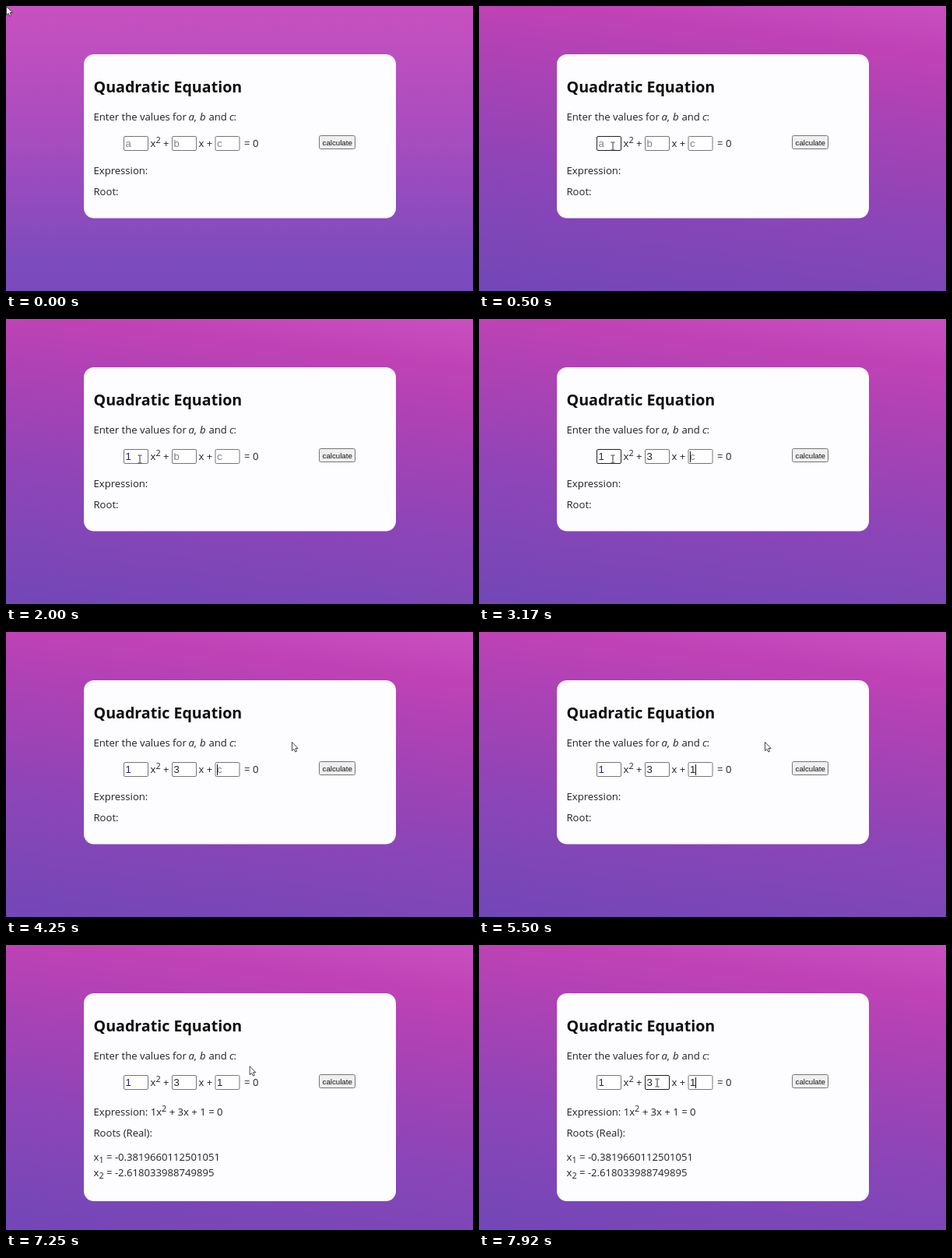
An HTML page for the animation above (8000 ms loop, 600 by 366 pixels).

```html
<!DOCTYPE html>
<html lang="en">
<head>
<meta charset="utf-8">
<title>Quadratic Equation</title>
<style>
html, body { margin: 0; width: 100%; height: 100%; overflow: hidden; }
body { background: linear-gradient(7deg, #7247b8, #8b45b7 35%, #a942b5 65%, #bf42b5 85%, #c950c1); }
#dawn { position: absolute; inset: 0; background: linear-gradient(#c950c0, #a44cbe 50%, #7c4bbe 90%, #7a4bbe); }
svg { position: absolute; left: 0; top: 0; font: 13.1px "Open Sans", sans-serif; fill: #212121; }
text { white-space: pre; }
h1 { display: none; }
.title { font-size: 19.65px; font-weight: 700; fill: #0c0c0c; }
.small { font-size: 10.9px; }
.it { font-style: italic; }
.field rect { fill: #fff; stroke: #767676; }
.field.hover rect { stroke: #222; }
.field text { font-family: "Liberation Sans", Arial, sans-serif; fill: #808080; }
.field.filled text { fill: #222; }
#a.filled text { fill: #1a1a8c; }
#menu { font-size: 7.8px; fill: #555; }
</style>
</head>
<body>
<div id="dawn"></div>
<svg width="600" height="366" viewBox="0 0 600 366">
  <rect id="card" x="100" y="62" width="401" height="210.5" rx="13" fill="#fdfcfe"/>
  <text class="title" x="112.5" y="111">Quadratic Equation</text>
  <text y="147"><tspan x="112.5">Enter the values for</tspan><tspan class="it" x="234.5">a</tspan><tspan x="241.5">,</tspan><tspan class="it" x="249">b</tspan><tspan x="260.5">and</tspan><tspan class="it" x="287">c</tspan><tspan x="292.5">:</tspan></text>
  <text y="181"><tspan x="185.5">x</tspan><tspan class="small" x="192.5" y="176">2</tspan><tspan x="202" y="181">+</tspan><tspan x="247.5">x +</tspan><tspan x="306">= 0</tspan></text>
  <g id="fields"></g>
  <rect x="402.5" y="166.5" width="46" height="17" rx="2" fill="#efefef" stroke="#767676"/>
  <text x="425.7" y="178.7" text-anchor="middle" style="font:9.7px 'Liberation Sans',Arial,sans-serif" fill="#111">calculate</text>
  <g id="empty">
    <text x="112.5" y="216">Expression:</text>
    <text x="112.5" y="243">Root:</text>
  </g>
  <g id="result">
    <text x="112.5" y="219">Expression: 1x<tspan class="small" dy="-5">2</tspan><tspan dy="5"> + 3x + 1 = 0</tspan></text>
    <text x="112.5" y="246">Roots (Real):</text>
    <text x="112.5" y="277">x<tspan class="small" dy="3">1</tspan><tspan dy="-3"> = -0.3819660112501051</tspan></text>
    <text x="112.5" y="297">x<tspan class="small" dy="3">2</tspan><tspan dy="-3"> = -2.618033988749895</tspan></text>
  </g>
  <g id="menu"><rect x="153.5" y="190.5" width="97" height="140.5" rx="2" fill="#fff" stroke="#ddd"/></g>
  <path id="caret" d="M.5 170v14" stroke="#111"/>
  <path id="arrow" d="M.5 .5V11.5L3 9.3L4.8 13L6.6 12.2L4.9 8.5H8.2Z" fill="#fff" stroke="#333" stroke-width=".9"/>
  <path id="beam" d="M-2.5 -5H-.7L0 -4.4L.7 -5H2.5M0 -4.4V4.4M-2.5 5H-.7L0 4.4L.7 5H2.5" fill="none" stroke="#333"/>
</svg>
<script>
const $ = id => document.getElementById(id);
const show = (id, on) => $(id).style.display = on ? '' : 'none';
const place = (id, x, y) => $(id).setAttribute('transform', `translate(${x} ${y})`);

const FPS = 12, LOOP = 8000;
// typed: frame at which the value replaces the placeholder
const fields = [
  { id: 'a', x: 151, value: '1', typed: 18 },
  { id: 'b', x: 213, value: '3', typed: 33 },
  { id: 'c', x: 268.5, value: '1', typed: 53 }
];
$('fields').innerHTML = fields.map(f =>
  `<g class="field" id="${f.id}"><rect x="${f.x + .5}" y="167.5" width="31" height="18" rx="1.5"/><text x="${f.x + 2.6}" y="181"></text></g>`).join('');
$('menu').innerHTML += ['1', '0', '2', 'x', '-1', 'mgvb'].map((s, i) =>
  `<text x="161.5" y="${209.5 + i * 22.2}">${s}</text>`).join('');

// caret: [from, to, x]
const carets = [[9, 15, 153], [18, 24, 161], [30, 33, 215], [33, 38, 222], [38, 44, 271],
  [51, 53, 271], [53, 59, 278], [65, 72, 278], [78, 84, 278], [90, 96, 278]];
// pointer moves: [from, to, x, y]
const moves = [[0, 6, 172, 180], [42, 49, 367, 141], [81, 95, 229, 177]];
// menu opacity: [frame, opacity]
const fades = [[8, 0], [11, 1], [18, 1], [22, 0]];

function pointer(n) {
  let x = 0, y = 0;
  for (const [from, to, px, py] of moves) {
    const p = Math.min(1, Math.max(0, (n - from) / (to - from)));
    const e = p * p * (3 - 2 * p);
    x += (px - x) * e;
    y += (py - y) * e;
  }
  return [x, y];
}

function menuOpacity(n) {
  for (let i = 1; i < fades.length; i++) {
    const [from, a] = fades[i - 1], [to, b] = fades[i];
    if (n >= from && n < to) return a + (b - a) * (n - from) / (to - from);
  }
  return 0;
}

function draw(ms) {
  const n = Math.floor((ms + 4) * FPS / 1000);
  const [x, y] = pointer(n);
  const inRow = y > 166 && y < 187;
  const focus = n < 9 ? '' : n < 30 ? 'a' : n < 38 ? 'b' : 'c';

  $('dawn').style.opacity = Math.max(0, 1 - n / 6);
  for (const f of fields) {
    const filled = n >= f.typed, over = inRow && x > f.x && x < f.x + 32;
    $(f.id).setAttribute('class', 'field' + (filled ? ' filled' : '') + (over && focus !== f.id ? ' hover' : ''));
    $(f.id).lastChild.textContent = filled ? f.value : f.id;
  }

  const solved = n >= 67;
  $('card').setAttribute('height', solved ? 267 : 210.5);
  show('result', solved);
  show('empty', !solved);
  $('menu').style.opacity = menuOpacity(n);

  const caret = carets.find(c => n >= c[0] && n < c[1]);
  show('caret', caret);
  if (caret) place('caret', caret[2], 0);

  const text = inRow && x > 151 && x < 326;
  show('beam', text);
  show('arrow', !text);
  place(text ? 'beam' : 'arrow', x, y);
}

function tick() {
  draw(performance.now() % LOOP);
  requestAnimationFrame(tick);
}
tick();
</script>
</body>
</html>
```
